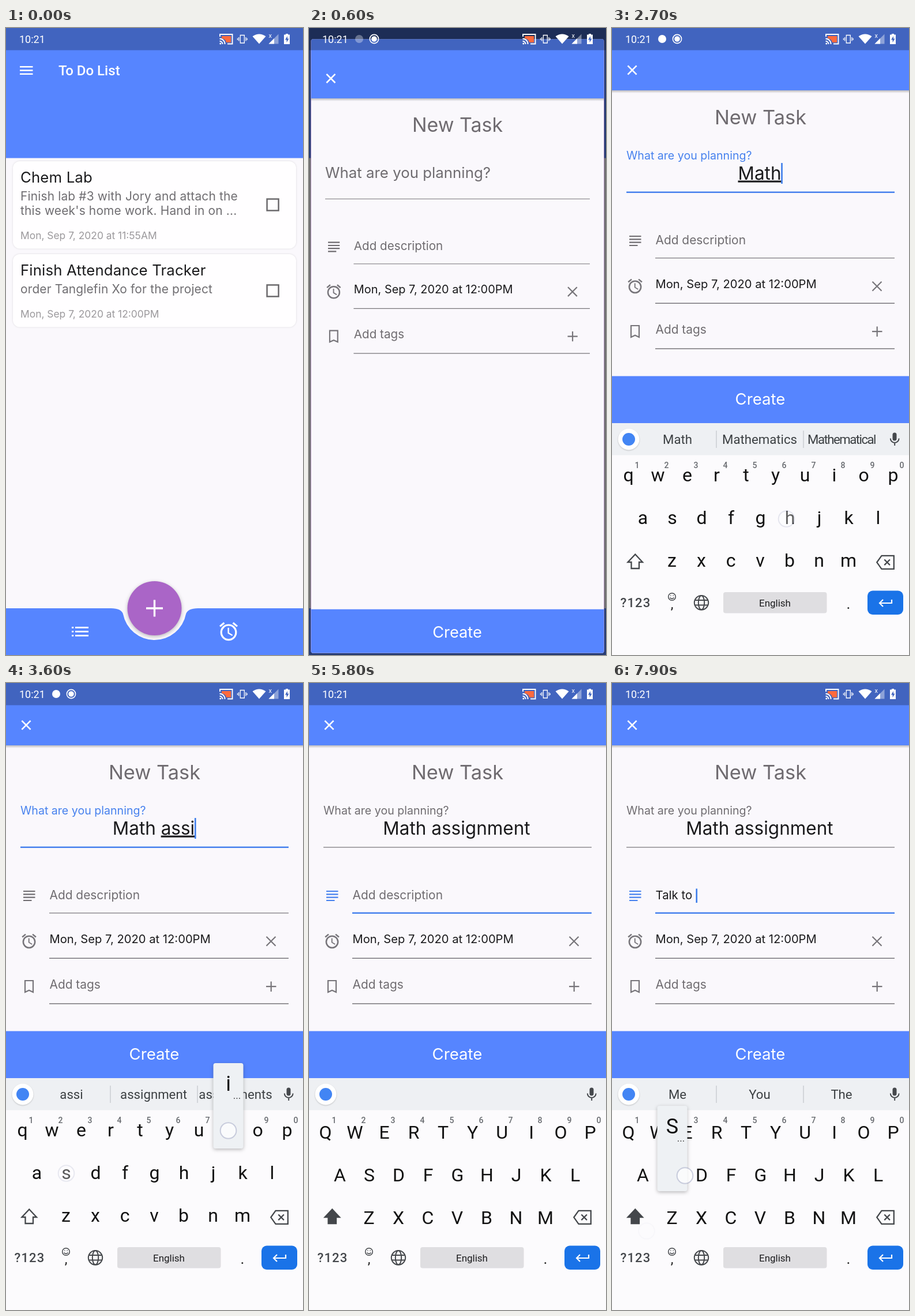
These frames come from a looping animation (515 by 1087 pixels, 8 s). An HTML page:

```html
<!DOCTYPE html>
<html lang="en">
<head>
<meta charset="utf-8">
<title>To Do List</title>
<style>
  html, body { margin: 0; width: 100%; height: 100%; overflow: hidden; background: #faf8fc; }
  svg { display: block; width: 100%; height: 100%; }
  text { font-family: Inter, "Open Sans", sans-serif; white-space: pre; }
  .rb, .rb text { font-family: Roboto, "Noto Sans", sans-serif; }
  .mid, .mid text { text-anchor: middle; }
  .line { fill: none; stroke: currentColor; }
  .word { text-decoration: underline; text-decoration-skip-ink: none; }
  .card { fill: #fffeff; filter: drop-shadow(0 .5px 1.5px #0002); }
  .lift { filter: drop-shadow(0 2px 3px #0004); }
  .h { font-size: 25.8px; fill: #1b1b1d; letter-spacing: .005em; }
  .b { font-size: 20.9px; fill: #6f6d71; letter-spacing: .008em; }
  .d { font-size: 17.4px; fill: #9b999c; }
  .hint { font-size: 20.9px; fill: #6f6c70; }
  .tight { letter-spacing: -1.5px; }
  .touch { fill: #ffffffb0; stroke: #8088b060; stroke-width: 2; }
</style>
</head>
<body>
<svg viewBox="0 0 515 1087">
  <defs>
    <path id="alarm" d="M22 5.72l-4.6-3.86-1.29 1.53 4.6 3.86zM7.88 3.39L6.6 1.86 2 5.71l1.29 1.53zM12.5 8H11v6l4.75 2.85.75-1.23-4-2.37zM12 4a9 9 0 1 0 0 18a9 9 0 0 0 0-18zm0 16a7 7 0 1 1 0-14a7 7 0 0 1 0 14z"/>
    <path id="cross" d="M-1-1L1 1M1-1L-1 1" vector-effect="non-scaling-stroke"/>
    <linearGradient id="shade" x2="0" y2="1">
      <stop stop-color="#000" stop-opacity=".25"/><stop offset="1" stop-color="#000" stop-opacity="0"/>
    </linearGradient>
    <clipPath id="hole"><rect id="clip"/></clipPath>
  </defs>

  <g id="list">
    <rect width="515" height="1087" fill="#faf8fc"/>
    <rect width="515" height="225.5" fill="#5685ff"/>
    <path d="M24 67.2h22.5M24 73.5h22.5M24 79.8h22.5" stroke="#fff" stroke-width="2.5"/>
    <text class="rb" x="91" y="82" font-size="24" font-weight="500" fill="#fff">To Do List</text>
    <rect class="card" x="12" y="231" width="491" height="151.5" rx="12"/>
    <text class="h" x="25" y="268">Chem Lab</text>
    <text class="b" x="25" y="299">Finish lab #3 with Jory and attach the</text>
    <text class="b" x="25" y="324">this week's home work. Hand in on ...</text>
    <text class="d" x="25" y="366">Mon, Sep 7, 2020 at 11:55AM</text>
    <rect class="card" x="12" y="392" width="491" height="126.5" rx="12"/>
    <text class="h" x="25" y="429">Finish Attendance Tracker</text>
    <text class="b" x="25" y="460">order Tanglefin Xo for the project</text>
    <text class="d" x="25" y="502">Mon, Sep 7, 2020 at 12:00PM</text>
    <path d="M452.6 296.6h20v20h-20zM452.6 445.4h20v20h-20z" fill="none" stroke="#6b696c" stroke-width="2.5"/>
    <path d="M0 1006H182Q200 1006 203 1016A55.5 55.5 0 0 0 312 1016Q315 1006 333 1006H515V1087H0Z" fill="#5685ff"/>
    <path d="M114 1039.3h3.2M120 1039.3h23M114 1046.3h3.2M120 1046.3h23M114 1053.3h3.2M120 1053.3h23" stroke="#fff" stroke-width="2.8"/>
    <use href="#alarm" transform="translate(366.8 1027)scale(1.6)" fill="#fff"/>
    <g id="fab">
      <circle class="lift" cx="257.5" cy="1006" r="47" fill="#aa65c7"/>
      <path d="M243 1006h29M257.5 991.5v29" stroke="#fff" stroke-width="3.4"/>
    </g>
  </g>
  <rect id="scrim" width="515" height="1087"/>

  <g id="dialog" clip-path="url(#hole)">
    <rect width="515" height="1087" fill="#aa65c7"/>
    <g id="page">
      <rect width="515" height="1087" fill="#faf8fc"/>
      <rect width="515" height="108" fill="#5685ff"/>
      <rect y="108" width="515" height="5" fill="url(#shade)"/>
      <use href="#cross" class="line" color="#fff" stroke-width="2.7" transform="translate(35 73)scale(7.6)"/>
      <text class="mid" x="257.5" y="167" font-size="34.4" fill="#6f6b70">New Task</text>
      <text id="label" x="25">What are you planning?</text>
      <text id="title" class="mid" x="256" y="262.5" font-size="31.5" fill="#1a1a1c"><tspan></tspan><tspan class="word"></tspan></text>
      <path id="titleLine" class="line" d="M25 284.7H490"/>
      <path id="descIcon" class="line" stroke-width="2.2" d="M30 361h20.5M30 366.4h20.5M30 371.6h20.5M30 377h14.5"/>
      <text id="hint" class="hint" x="75.5" y="375">Add description</text>
      <text id="desc" x="75.5" y="375" font-size="20.4" fill="#1a1a1c"><tspan></tspan><tspan class="word"></tspan></text>
      <path id="descLine" class="line" d="M75 398.7H490"/>
      <g color="#77757a" stroke-width="2.2">
        <use href="#alarm" transform="translate(24.8 432.3)scale(1.27)" fill="currentColor" stroke="none"/>
        <use href="#cross" class="line" transform="translate(459.5 447.7)scale(8)"/>
        <path class="line" d="M33 516H47V536L40 532.8L33 536ZM451 526.2h17.5M459.7 517.5v17.5"/>
        <path class="line" stroke-width="1.4" d="M75 477.2H490M75 556H490"/>
      </g>
      <text x="75.5" y="451" font-size="20.2" fill="#1a1a1c">Mon, Sep 7, 2020 at 12:00PM</text>
      <text class="hint" x="75.5" y="530">Add tags</text>
      <rect id="caret" width="2.6" fill="#3d7dea"/>
      <g id="create">
        <rect width="515" height="82" fill="#5685ff"/>
        <text class="mid" x="257" y="49.5" font-size="27.6" fill="#fff">Create</text>
      </g>
    </g>
  </g>

  <g id="board" class="rb mid">
    <rect y="685" width="515" height="402" fill="#fcfbfd"/>
    <rect y="685" width="515" height="55.5" fill="#eef0f3"/>
    <circle cx="29" cy="713" r="18.5" fill="#fff" style="filter:drop-shadow(0 1px 1px #0003)"/>
    <circle cx="29" cy="713" r="11" fill="#4285f4"/>
    <g color="#45484c">
      <rect x="486.5" y="701.5" width="7" height="14" rx="3.5" fill="currentColor"/>
      <path class="line" stroke-width="2" d="M482.8 711.5a7.4 7.4 0 0 0 14.8 0M490.2 719v5"/>
    </g>
    <path id="dividers" d="M181 698v30M332 698v30" stroke="#c8cbcf" stroke-width="1.4"/>
    <g id="words" font-size="22.2" fill="#3c4043">
      <text x="113.5" y="721"/><text x="256" y="721"/><text x="398" y="721"/>
    </g>
    <g id="keys" font-size="32" fill="#111"></g>
    <g id="digits" font-size="14" font-weight="500" fill="#66696e"></g>
    <g color="#44474b" stroke-width="2.3">
      <path id="shift" stroke="currentColor" d="M40.3 912.5L53 926H47V937H33.5V926H27.5Z"/>
      <path class="line" d="M467.5 914.8H488.8V937.8H467.5L459.3 926.3ZM472.3 921.5l9.6 9.6M481.9 921.5l-9.6 9.6"/>
      <text x="41" y="1004" font-size="22" font-weight="500" letter-spacing="1.2" fill="currentColor">?123</text>
      <g class="line" stroke-width="1.5">
        <circle cx="104" cy="986" r="6.3"/><path d="M100.5 987.5q3.5 4 7 0M101.7 983.5v1.2M106.3 983.5v1.2"/>
      </g>
      <text x="104" y="1007" font-size="24" fill="#222">,</text>
      <g class="line" stroke-width="2">
        <circle cx="155" cy="996.3" r="12.2"/><ellipse cx="155" cy="996.3" rx="5.2" ry="12.2"/>
        <path d="M144 992h22M144 1000.6h22"/>
      </g>
    </g>
    <rect x="193" y="978" width="179.5" height="36.5" rx="4" fill="#dfdee1"/>
    <text x="282.5" y="1003" font-size="17" fill="#1c1c1e">English</text>
    <text x="410" y="1007" font-size="26" fill="#222">.</text>
    <rect x="443" y="975.5" width="62" height="41.5" rx="9" fill="#1a73e8"/>
    <path class="line" color="#fff" stroke-width="2.2" d="M485 991v6h-21M470 991l-6 6l6 6"/>
    <g id="pop">
      <rect class="lift" x="-26" y="-127" width="52" height="148" rx="4" fill="#eef1f4"/>
      <text y="-79" font-size="36" fill="#111"/>
      <text x="15" y="-65" font-size="17" fill="#333">...</text>
    </g>
  </g>

  <rect width="515" height="38.5" fill-opacity=".25"/>
  <g class="rb" fill="#fff" color="#fff">
    <text x="23" y="26" font-size="18">10:21</text>
    <circle id="badge" cx="87" cy="19" r="7"/>
    <g id="record"><circle cx="113" cy="19" r="4.8"/><circle class="line" cx="113" cy="19" r="7.6" stroke-width="1.6"/></g>
    <path d="M374 14h16v11h-8q-1-6-8-7z" fill="#ff6a3d"/>
    <path class="line" stroke-width="1.9" d="M371 15V11h21.5v16.5H384M370.5 18.5a9 9 0 0 1 9 9.5M370.5 22.8a5 5 0 0 1 5 5.2"/>
    <circle cx="371.8" cy="27" r="1.5"/>
    <path class="line" stroke-width="1.3" d="M406.3 12.5h7v13.5h-7zM403.7 16v6.5M415.9 16v6.5M401.5 17.5v3.5M418 17.5v3.5"/>
    <path d="M427.5 14.5Q439 6.5 450.5 14.5L439 27.5Z"/>
    <path d="M472.5 10.5V27.5H455.5Z" opacity=".4"/><path d="M465 18V27.5H455.5Z"/>
    <text x="455.5" y="17" font-size="11">x</text>
    <path d="M485 11.5V10h4v1.5h3V28h-10V11.5z"/>
    <path d="M488 14l-4 6.5h2.6V25l4-6.5H488z" fill="#4064bf"/>
  </g>
  <g id="touches"></g>
</svg>
<script>
const LOOP = 8000, TITLE_FOCUS = 1450, DESC_FOCUS = 5290, SHIFT = 7600, RELEASE = 100;
const GRAY = [111, 108, 112], RULE = [144, 142, 146], BLUE = [70, 129, 238];
const $ = id => document.getElementById(id);
const clamp = v => Math.max(0, Math.min(1, v));
const lerp = (a, b, k) => a + (b - a) * k;
const mix = (a, b, k) => `rgb(${a.map((v, i) => Math.round(lerp(v, b[i], k)))})`;
const set = (el, attrs) => { for (const k in attrs) el.setAttribute(k, attrs[k]); };
const add = (parent, tag, attrs) => {
  const el = document.createElementNS('http://www.w3.org/2000/svg', tag);
  set(el, attrs);
  return parent.appendChild(el);
};

// cubic-bezier(.4, 0, .2, 1)
function ease(x) {
  if (x <= 0 || x >= 1) return clamp(x);
  let lo = 0, hi = 1, s = .5;
  for (let i = 0; i < 24; i++) {
    s = (lo + hi) / 2;
    const at = 1.2 * (1 - s) ** 2 * s + .6 * (1 - s) * s * s + s ** 3;
    if (at < x) lo = s; else hi = s;
  }
  return 3 * s * s - 2 * s ** 3;
}

const keys = {};
[['qwertyuiop', 28.5], ['asdfghjkl', 53.5], ['zxcvbnm', 104]].forEach(([row, x0], r) =>
  [...row].forEach((ch, i) => {
    const x = x0 + 51 * i, y = 786 + 74 * r;
    keys[ch] = { x, y, el: add($('keys'), 'text', { x }) };
  }));
[...'1234567890'].forEach((n, i) =>
  add($('digits'), 'text', { x: 43.5 + 51 * i, y: 763 }).textContent = n);

// Finger offsets from the key centre, by press time
const drift = { 2480: [-6, 1], 6480: [-25, 32], 6650: [4, -3], 7850: [22, 4] };
const typed = (str, times) => [...str].map((ch, i) => {
  const key = keys[ch.toLowerCase()], [dx, dy] = drift[times[i]] || [0, 0];
  return { ch, key, at: times[i], x: key ? key.x + dx : 326, y: key ? key.y - 10 + dy : 1012 };
});
const titleTaps = typed('Math assignment',
  [2180, 2290, 2380, 2480, 2780, 3120, 3250, 3370, 3500, 3630, 3760, 3890, 4020, 4150, 4280]);
const descTaps = typed('Talk to S', [5960, 6480, 6650, 6850, 7000, 7130, 7290, 7450, 7850]);
const typing = [...titleTaps, ...descTaps];
const taps = [...typing,
  { at: 60, x: 262, y: 1008 }, { at: 1360, x: 92, y: 234 },
  { at: 5080, x: 150, y: 368 }, { at: SHIFT, x: 60, y: 950 }];
taps.forEach(tap => tap.el = add($('touches'), 'circle', { class: 'touch', cx: tap.x, cy: tap.y, r: 13.8 }));

const guesses = {
  '': '||', 'M': 'M|My|More', 'Ma': 'Ma|May|Make', 'Mat': 'Mat|Mate|Math',
  'Math': 'Math|Mathematics|Mathematical', 'Math ': 'is|and|homework',
  'Math assignment': 'assignment|assignments|',
  'T': 'T|The|To', 'Ta': 'Ta|Ya|Talk', 'Tal': 'Tal|Talk|Tall', 'Talk': 'Talk|Talking|Talked',
  'Talk ': 'to|about|with', 'Talk t': 't|to|the', 'Talk to': 'to|too|two', 'Talk to ': 'me|you|the'
};
const cap = s => s.charAt(0).toUpperCase() + s.slice(1);
const textAt = (list, t) => list.filter(k => t >= k.at + RELEASE).map(k => k.ch).join('');

function showField(el, text, active) {
  const cut = active ? text.lastIndexOf(' ') + 1 : text.length;
  el.children[0].textContent = text.slice(0, cut);
  el.children[1].textContent = text.slice(cut);
}
const showLine = (el, k) => set(el, { color: mix(RULE, BLUE, k), 'stroke-width': lerp(1.4, 2.6, k) });

function drawOpening(t) {
  const p = ease((t - 300) / 360), q = 1 - p;
  const top = 958 * (1 - p ** 1.25), bottom = 1053 + 34 * p - 180 * p * q;
  const x = 210 * q, w = lerp(95, 515, p);
  $('dialog').style.display = p > 0 ? '' : 'none';
  $('fab').style.display = p > 0 ? 'none' : '';
  set($('clip'), { x, y: top, width: w, height: bottom - top, rx: 47 * q ** .6 });
  set($('page'), { transform: `translate(${x} ${958 * q})scale(${w / 515})`, opacity: clamp(p / .4) });
  set($('scrim'), { opacity: .55 * clamp(p * 2) });
  set($('record'), { opacity: clamp((t - 300) / 200) * clamp((5250 - t) / 300) });
  set($('badge'), { opacity: clamp((t - 400) / 600) * clamp((5250 - t) / 300) });
}

function drawForm(t, title, desc) {
  const onTitle = t >= TITLE_FOCUS && t < DESC_FOCUS, onDesc = t >= DESC_FOCUS;
  const float = ease((t - 1445) / 200), glow = onDesc ? 0 : float;
  set($('label'), {
    y: lerp(248, 228, float), 'font-size': lerp(26.2, 19.6, float), fill: mix(GRAY, BLUE, glow)
  });
  showField($('title'), title, onTitle);
  showField($('desc'), desc, onDesc);
  showLine($('titleLine'), glow);
  showLine($('descLine'), +onDesc);
  set($('descIcon'), { color: mix(GRAY, BLUE, +onDesc) });
  $('hint').style.display = desc ? 'none' : '';
  set($('create'), { transform: `translate(0 ${t < 1700 ? 1005.5 : 603.5})` });

  const resets = typing.map(k => k.at + RELEASE).concat(TITLE_FOCUS, DESC_FOCUS).filter(r => r <= t);
  const on = resets.length && Math.floor((t - Math.max(...resets)) / 500) % 2 === 0;
  const field = $(onDesc ? 'desc' : 'title'), len = (onDesc ? desc : title) ? field.getComputedTextLength() : 0;
  set($('caret'), {
    x: onDesc ? 76 + len : 255.7 + len / 2, y: onDesc ? 356.5 : 234,
    height: onDesc ? 24.5 : 36, opacity: on ? 1 : 0
  });
}

function drawBoard(t, text) {
  const up = clamp((t - 1400) / 200), upper = !text || t >= SHIFT + 80;
  set($('board'), { transform: `translate(0 ${210 * (1 - up)})`, opacity: up });
  for (const ch in keys) {
    const { y, el } = keys[ch];
    el.textContent = upper ? ch.toUpperCase() : ch;
    set(el, { y: upper ? y + 4 : y });
  }
  set($('shift'), { fill: upper ? 'currentColor' : 'none' });

  const last = text.slice(text.lastIndexOf(' ') + 1);
  const words = (guesses[text] ?? `${last}|assignment|assignments`).split('|');
  [...$('words').children].forEach((el, i) => {
    el.textContent = upper ? cap(words[i]) : words[i];
    el.setAttribute('class', words[i].length > 11 ? 'tight' : '');
  });
  set($('dividers'), { opacity: text ? 1 : 0 });

  const press = typing.findLast(k => k.key && t >= k.at && t < k.at + 110);
  $('pop').style.display = press ? '' : 'none';
  if (press) {
    const [, letter, dots] = $('pop').children;
    set($('pop'), { transform: `translate(${press.key.x} ${press.key.y})` });
    letter.textContent = press.ch;
    set(dots, { opacity: /[aeiouscn]/i.test(press.ch) ? 1 : 0 });
  }
}

function draw(t) {
  const title = textAt(titleTaps, t), desc = textAt(descTaps, t);
  drawOpening(t);
  drawForm(t, title, desc);
  drawBoard(t, t < DESC_FOCUS ? title : desc);
  for (const { at, el } of taps)
    set(el, { opacity: t < at ? 0 : clamp(1 - (t - at - 120) / 200) });
}

const start = performance.now();
(function tick() {
  draw((performance.now() - start) % LOOP);
  requestAnimationFrame(tick);
})();
</script>
</body>
</html>
```
